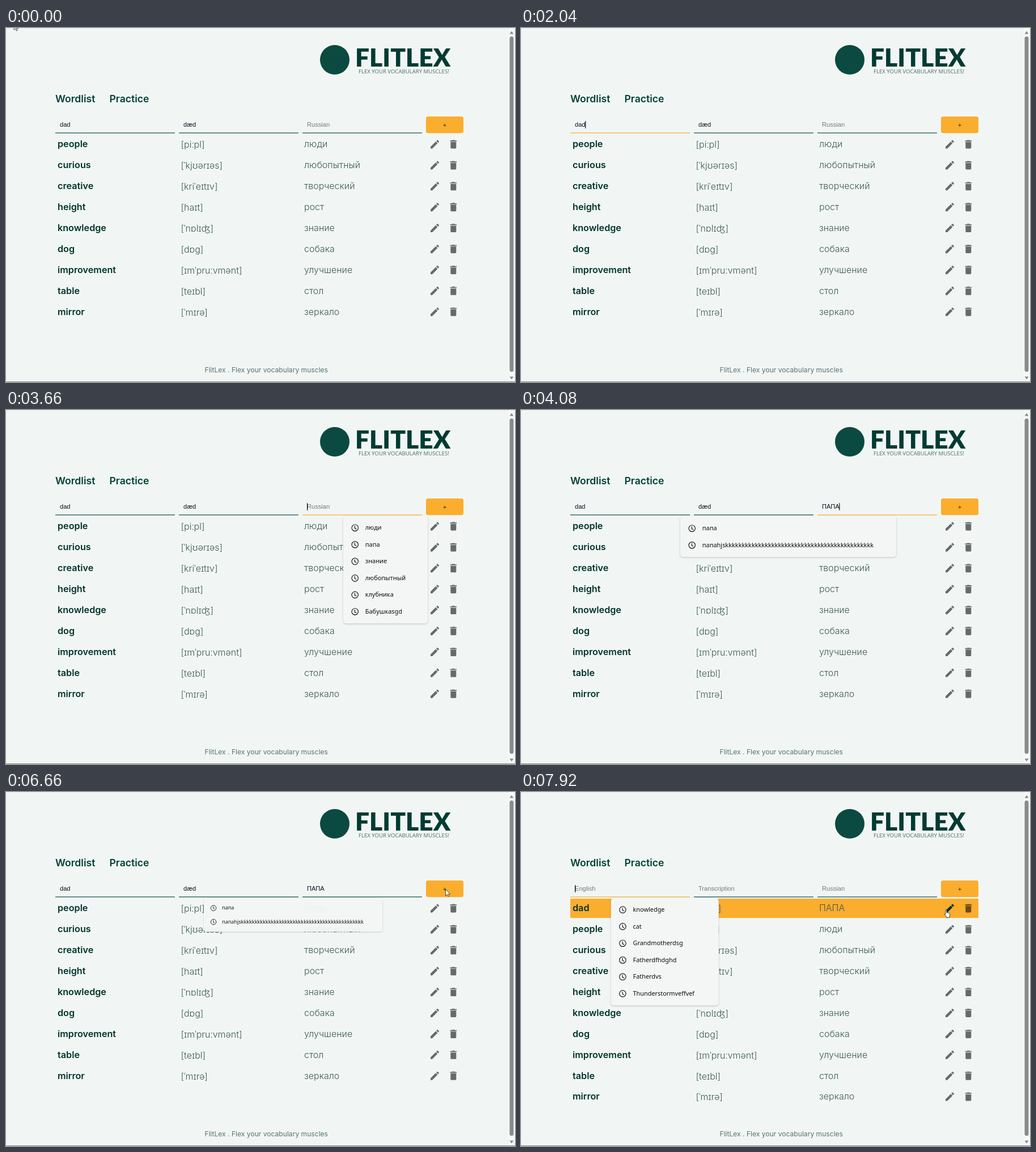
An HTML page that plays this animation: 898x624 px, repeating every 8 s.

```html
<!DOCTYPE html>
<html lang="en">
<head>
<meta charset="utf-8">
<title>Word list</title>
<style>
  html, body { margin: 0; width: 100%; height: 100%; overflow: hidden; background: #f1f6f4; }
  svg { display: block; width: 898px; height: 624px; }
  text { white-space: pre; }
  .brand { font: 900 44.3px Lato, sans-serif; fill: #003b32; }
  .slogan { font: 9.6px "Open Sans", sans-serif; fill: #4d6b66; }
  .nav { font: 600 17.6px Inter, sans-serif; fill: #004038; }
  .word { font: 600 16.2px Inter, sans-serif; fill: #00332a; }
  .plain { font: 300 16px Inter, "Noto Sans", sans-serif; fill: #3c5a54; }
  .foot { font: 12.1px Inter, sans-serif; fill: #57736e; text-anchor: end; }
  .field { font: 11.1px "Liberation Sans", Arial, sans-serif; fill: #06101f; }
  .hint { fill: #757b7b; }
  .plus { font: 11.1px "Liberation Sans", Arial, sans-serif; fill: #00352d; text-anchor: middle; }
  .item { font: 10.9px "Noto Sans", sans-serif; fill: #0c0c0c; }
  .icon { fill: #000; fill-opacity: .57; }
  .clock { fill: none; stroke: #1a1a1a; stroke-width: 1.2; }
  .panel { fill: #f4f6f6; filter: drop-shadow(0 1px 1.6px rgba(0, 0, 0, .22)); }
  .hover .edit { fill: #00302a; fill-opacity: 1; }
</style>
</head>
<body>
<svg id="stage" viewBox="0 0 898 624">
  <rect width="898" height="624" fill="#f1f6f4"/>
  <rect width="898" height="1" fill="#e9eeed"/>
  <rect x="887" width="11" height="623" fill="#f6f8f7"/>
  <rect x="888.5" y="15" width="7" height="591" rx="3.5" fill="#8a8a8a"/>
  <path d="M888.5 10.5h7l-3.5-5ZM888.5 614.5h7l-3.5 5Z" fill="#8a8a8a"/>
  <rect y="623" width="898" height="1" fill="#858a89"/>
  <circle cx="580" cy="56" r="26" fill="#0a4a40"/>
  <text class="brand" x="616" y="67.5">FLITLEX</text>
  <text class="slogan" x="622" y="80">FLEX YOUR VOCABULARY MUSCLES!</text>
  <text class="nav" x="87" y="131">Wordlist</text>
  <text class="nav" x="182.5" y="131">Practice</text>
  <text class="foot" x="568" y="606.5">FlitLex . Flex your vocabulary muscles</text>
  <rect x="741" y="156" width="66" height="29.3" rx="3.5" fill="#fbad2d"/>
  <text class="plus" x="774" y="174.5">+</text>
</svg>
<script>
const NS = 'http://www.w3.org/2000/svg';
const stage = document.getElementById('stage');
const LOOP = 8000, TICK = 60, ROW = 36.9;

const words = [
  ['dad', '[dæd]', 'ПАПА'],
  ['people', '[piːpl]', 'люди'],
  ['curious', '[ˈkjʊərɪəs]', 'любопытный'],
  ['creative', '[kriˈeɪtɪv]', 'творческий'],
  ['height', '[haɪt]', 'рост'],
  ['knowledge', '[ˈnɒlɪʤ]', 'знание'],
  ['dog', '[dɒg]', 'собака'],
  ['improvement', '[ɪmˈpruːvmənt]', 'улучшение'],
  ['table', '[teɪbl]', 'стол'],
  ['mirror', '[ˈmɪrə]', 'зеркало']
];
const hints = ['English', 'Transcription', 'Russian'];
const fieldX = [87, 305, 523];

// Step tables: [time, value...], each held until the next entry
const focusSteps = [[0, -1], [1260, 0], [2160, 1], [3420, 2], [6660, -1], [6780, 0]];
const caretSteps = [[0, 0], [1260, 1], [1680, 0], [2040, 1], [2520, 0], [3000, 1], [4500, 0], [4980, 1],
  [5340, 0], [5760, 1], [6180, 0], [6780, 1], [7260, 0], [7620, 1]];
const typeSteps = [[0, ''], [3780, 'П'], [3900, 'ПА'], [3960, 'ПАП'], [4080, 'ПАПА'], [6780, '']];
const menuSteps = [[0, -1], [3480, 0, .9, .5], [3540, 0, .97, .85], [3600, 0, 1, 1], [3840, 1, 1, 1],
  [6660, 1, .827, .95], [6720, -1], [6960, 2, .9, .5], [7020, 2, .97, .85], [7080, 2, .993, 1], [7140, 2, 1, 1]];

// Pointer trips: shape, start, end, from, to, visible from, visible until
const trips = [
  ['arrow', 180, 660, [14, -8], [159, 150], 0, 720],
  ['beam', 1620, 1740, [166, 159], [349, 169], 1680, 1800],
  ['beam', 2460, 2880, [349, 169], [567, 169], 2520, 2940],
  ['arrow', 6180, 6420, [700, 168], [775.5, 171.5], 6240, 7560],
  ['arrow', 7560, 7800, [775.5, 171.5], [749, 207], 7560, 7860],
  ['hand', 7860, 7920, [749, 207], [749, 207], 7860, LOOP]
];

const held = (steps, t) => steps.filter(s => s[0] <= t).pop();

function add(parent, tag, attrs = {}, content = '') {
  const node = document.createElementNS(NS, tag);
  for (const key in attrs) node.setAttribute(key, attrs[key]);
  node.textContent = content;
  return parent.appendChild(node);
}
const label = (parent, cls, x, y, content) => add(parent, 'text', { class: cls, x, y }, content);
const show = (node, on) => node.setAttribute('visibility', on ? 'visible' : 'hidden');

const EDIT = 'M3 17.25V21h3.75L17.81 9.94l-3.75-3.75ZM20.71 7.04a1 1 0 0 0 0-1.41l-2.34-2.34a1 1 0 0 0-1.41 0l-1.83 1.83 3.75 3.75Z';
const BIN = 'M6 19c0 1.1.9 2 2 2h8c1.1 0 2-.9 2-2V7H6ZM19 4h-3.5l-1-1h-5l-1 1H5v2h14Z';

const rows = words.map(([word, sound, meaning]) => {
  const g = add(stage, 'g');
  const back = add(g, 'rect', { x: 87, y: 188, width: 720, height: 34, fill: '#fbad2d', visibility: 'hidden' });
  label(g, 'word', 91, 210.4, word);
  label(g, 'plain', 308.5, 211.4, sound);
  label(g, 'plain', 526, 210.4, meaning);
  add(g, 'path', { class: 'icon edit', d: EDIT, transform: 'translate(746.5 195) scale(.833)' });
  add(g, 'path', { class: 'icon', d: BIN, transform: 'translate(779.3 195) scale(.833)' });
  return { g, back };
});

const fields = fieldX.map(x => ({
  x: x + 8,
  text: label(stage, 'field', x + 8, 174, ''),
  line: add(stage, 'rect', { x, y: 184.3, width: 211, height: 1.3 })
}));
const caret = add(stage, 'rect', { y: 164, width: 1.1, height: 13, fill: '#000' });

function makeMenu(x, width, y, origin, items) {
  const g = add(stage, 'g');
  const gap = 29.55;
  const bottom = y + (items.length - 1) * gap + 21.2;
  add(g, 'rect', { class: 'panel', x, y: 187, width, height: bottom - 187, rx: 5 });
  items.forEach((item, i) => {
    const cy = y + i * gap;
    add(g, 'circle', { class: 'clock', cx: x + 20.7, cy: cy + .4, r: 5.7 });
    add(g, 'path', { class: 'clock', d: `M${x + 20.3} ${cy - 3}v4l2.9 1.6` });
    label(g, 'item', x + 38.8, cy + 3.8, item);
  });
  return { g, origin };
}
const menus = [
  makeMenu(595, 149, 207.3, 595, ['люди', 'папа', 'знание', 'любопытный', 'клубника', 'Бабушкаsgd']),
  makeMenu(281, 381, 208.3, 674, ['папа', 'папаhjs' + 'k'.repeat(45)]),
  makeMenu(158.7, 190, 207.2, 159, ['knowledge', 'cat', 'Grandmotherdsg', 'Fatherdfhdghd', 'Fatherdvs', 'Thunderstormveffvef'])
];

const pointers = {
  arrow: add(stage, 'path', { d: 'M0 0V11.5L2.7 9 4.5 13 6.3 12.2 4.5 8.4H8.2Z', fill: '#fff', stroke: '#222', 'stroke-width': .8 }),
  beam: add(stage, 'path', { d: 'M-3 -7.5H3M0 -7.5V7.5M-3 7.5H3', fill: 'none', stroke: '#a3acaa', 'stroke-width': .8 }),
  hand: add(stage, 'path', {
    d: 'M0 1Q1 -.4 2 1V5.5L6 6.3Q8 6.8 7.8 9L7 12V14.5H1.6V13L-1.9 9Q-1.9 7.2 0 8.4Z',
    fill: '#fff', stroke: '#222', 'stroke-width': .8
  })
};

function drawRows(added, hover) {
  rows.forEach(({ g }, i) => g.setAttribute('transform', `translate(0 ${(added ? i : i - 1) * ROW})`));
  rows[0].g.setAttribute('display', added ? 'inline' : 'none');
  rows[0].g.setAttribute('class', hover ? 'hover' : '');
  show(rows[0].back, hover);
}

function drawFields(t, cleared) {
  const focus = held(focusSteps, t)[1];
  const values = cleared ? ['', '', ''] : ['dad', 'dæd', held(typeSteps, t)[1]];
  fields.forEach(({ text, line }, i) => {
    text.textContent = values[i] || hints[i];
    text.setAttribute('class', values[i] ? 'field' : 'field hint');
    line.setAttribute('fill', i === focus ? '#fbb23c' : '#1d5b55');
  });
  show(caret, focus >= 0 && held(caretSteps, t)[1]);
  if (focus >= 0) {
    const { x, text } = fields[focus];
    caret.setAttribute('x', x + (values[focus] ? text.getComputedTextLength() - .3 : 0));
  }
}

function drawMenu(t) {
  const [, open, scale, opacity] = held(menuSteps, t);
  menus.forEach(({ g, origin }, i) => {
    g.setAttribute('display', i === open ? 'inline' : 'none');
    if (i !== open) return;
    g.setAttribute('opacity', opacity);
    g.setAttribute('transform', `translate(${origin} 185) scale(${scale}) translate(${-origin} -185)`);
  });
}

// Returns the pointer height, or null while it is not visible
function drawPointer(t) {
  const trip = trips.find(([, , , , , since, until]) => t >= since && t < until);
  for (const name in pointers) show(pointers[name], trip && trip[0] === name);
  if (!trip) return null;
  const [shape, start, end, from, to] = trip;
  const p = Math.min(1, Math.max(0, (t - start) / (end - start)));
  const k = p * p * (3 - 2 * p);
  const [x, y] = from.map((v, i) => v + (to[i] - v) * k);
  pointers[shape].setAttribute('transform', `translate(${x} ${y})`);
  return y;
}

function draw(time) {
  const t = Math.floor((time % LOOP) / TICK) * TICK;
  const added = t >= 6780;
  const y = drawPointer(t);
  drawRows(added, added && y > 188);
  drawFields(t, added);
  drawMenu(t);
}

const begin = performance.now();
function loop() {
  draw(performance.now() - begin);
  requestAnimationFrame(loop);
}
loop();
</script>
</body>
</html>
```
